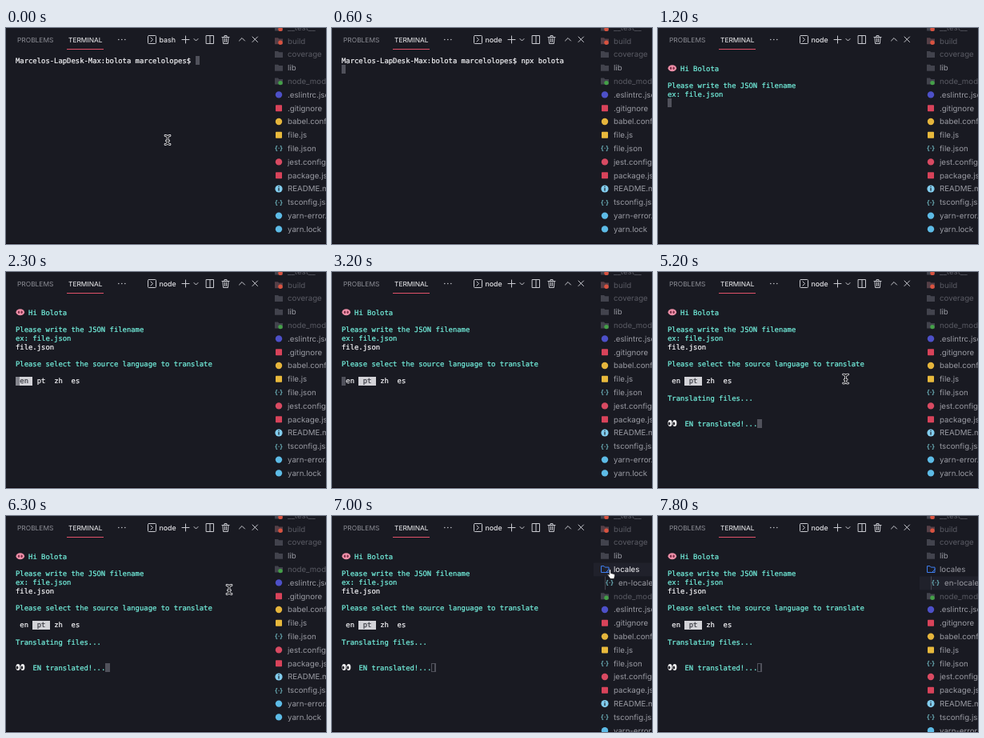
Animation, 400 px wide and 270 px high, one loop 8000 ms. Source, as an HTML page:

```html
<!DOCTYPE html>
<html lang="en">
<head>
<meta charset="utf-8">
<title>Terminal session</title>
<style>
html, body { margin: 0; width: 100%; height: 100%; overflow: hidden; background: #191a22; }
svg { display: block; width: 400px; height: 270px; }
text { font-family: Inter, "Open Sans", sans-serif; white-space: pre; text-rendering: geometricPrecision; }
.mono { font: 8.89px "DejaVu Sans Mono", monospace; stroke-width: .22; }
.line { fill: none; stroke-width: 1; stroke-linecap: round; stroke-linejoin: round; }
</style>
</head>
<body>
<svg id="stage" viewBox="0 0 400 270">
  <rect width="400" height="270" fill="#191a22"/>
  <rect y="269" width="400" height="1" fill="#120b12"/>
  <text x="14" y="18" font-size="8.4" fill="#8b8c94">PROBLEMS</text>
  <text x="78" y="18" font-size="8.4" fill="#f4f4f6">TERMINAL</text>
  <rect x="76" y="26" width="46" height="1" fill="#e0526a"/>
  <g fill="#c5c6cc"><circle cx="140.8" cy="14.500" r=".8"/><circle cx="144.8" cy="14.500" r=".8"/><circle cx="148.8" cy="14.500" r=".8"/></g>
  <g class="line" stroke="#c9cad0">
    <rect x="177.500" y="9.5" width="10" height="10" rx="1"/>
    <path d="M181 12l2.5 2.5L181 17M220 14.5h9M224.500 10v9M235 13.5l2.5 2.5 2.5-2.5"/>
    <path d="M250.5 9.5h9v10h-9zM255 9.5v10M270 11.500h9M273 11v-1.5h3V11M271 11.500l.6 8h5.8l.6-8M273.5 13v4.5M275.5 13v4.5"/>
    <path d="M291.5 16l3.5-3.500 3.5 3.5M308 11l6.500 6.500M314.500 11l-6.500 6.500"/>
  </g>
  <g id="live"></g>
</svg>
<script>
const LOOP = 8000, COL = 5.352, ROW = 10.65, TREE_ROW = 16.8;
const TEAL = "#74f2df", WHITE = "#f4f4f7", DIM = "#5a5b64", PLAIN = "#9b9ca4", BLOCK = "#50515b";
const BACK = "#191a22", FOLDER = "#42434d";
const live = document.getElementById("live");
const start = performance.now();

const colX = c => 12 + c * COL;
const rowY = r => 40.4 + r * ROW;
const rect = (x, y, w, h, fill, extra = "") =>
  `<rect x="${x}" y="${y}" width="${w}" height="${h}" fill="${fill}" ${extra}/>`;
const dot = (x, y, r, fill) => `<circle cx="${x}" cy="${y}" r="${r}" fill="${fill}"/>`;
const oval = (x, y, rx, ry, fill) => `<ellipse cx="${x}" cy="${y}" rx="${rx}" ry="${ry}" fill="${fill}"/>`;
const mono = (col, row, s, fill) =>
  `<text class="mono" x="${colX(col)}" y="${rowY(row) + 3.1}" fill="${fill}" stroke="${fill}">${s}</text>`;

// Fills whole character cells, snapped to pixels
const cells = (col, row, count, fill) => {
  const x = Math.round(colX(col)), y = Math.round(rowY(row) - 5.3);
  return rect(x, y, Math.round(colX(col + count)) - x, 11, fill);
};
const caret = (col, row, hollow) => cells(col, row, 1, BLOCK) + (hollow
  ? rect(Math.round(colX(col)) + 1, Math.round(rowY(row) - 5.3) + 1, 3, 9, BACK)
  : "");

// Icons, centred on (x, y)
const folder = (color, badge) => (x, y) =>
  `<path d="M${x - 5} ${y - 4}h4l1.300 1.300h4.700v6.700h-10z" fill="${color}"/>` +
  (badge ? dot(x + 2, y + 2, 2.7, badge) : "");
const openFolder = (x, y) =>
  `<path class="line" stroke="#3f7ff0" d="M${x - 4.5} ${y + 3.5}v-7.500h3.500l1.300 1.500h4.700v6zM${x + 2} ${y + 3.5}l3.500-4"/>`;
const ball = color => (x, y) => dot(x, y, 4.2, color);
const square = color => (x, y) => rect(x - 4, y - 4, 8, 8, color, 'rx=".8"');
const braces = (x, y) =>
  `<text x="${x}" y="${y + 2.8}" font-size="8" font-weight="600" text-anchor="middle" fill="#76c3cc">{·}</text>`;
const info = (x, y) => dot(x, y, 4.6, "#82cdee") + rect(x - .6, y - 1, 1.2, 3.6, BACK) + dot(x, y - 2.5, .7, BACK);

const folders = [
  ["__test__", folder(FOLDER, "#d9523f"), DIM],
  ["build", folder("#553f47", "#d9523f"), DIM],
  ["coverage", folder(FOLDER), DIM],
  ["lib", folder(FOLDER), PLAIN],
];
const files = [
  ["node_modules", folder(FOLDER, "#43a047"), DIM],
  [".eslintrc.json", ball("#4d50c8")],
  [".gitignore", square("#d8435a")],
  ["babel.config.js", ball("#e5b53c")],
  ["file.js", square("#e8b93c")],
  ["file.json", braces],
  ["jest.config.js", ball("#d84a62")],
  ["package.json", square("#d8435a")],
  ["README.md", info],
  ["tsconfig.json", braces],
  ["yarn-error.log", ball("#5dbbe6")],
  ["yarn.lock", ball("#5dbbe6")],
];

function tree(t) {
  const open = t >= 6900, picked = t >= 7300, rows = [...folders];
  if (t >= 6500) rows.push(["locales", open ? openFolder : folder("#3f7ff0"), open && !picked ? WHITE : PLAIN]);
  if (open) rows.push(["en-locale.json", braces, picked && t < 7800 ? "#b6b7be" : PLAIN, 6]);
  rows.push(...files);
  let s = "";
  if (open) {
    s += rect(327, picked ? 75.5 : 58.5, 73, 16.8, "#20212b");
    s += rect(341, 75.5, .8, 16.8, "#50515b");
  }
  rows.forEach(([name, icon, color = PLAIN, indent = 0], i) => {
    const y = -.6 + TREE_ROW * i;
    s += icon(341 + indent, y) +
      `<text x="${352 + indent}" y="${y + 3.4}" font-size="9.7" fill="${color}">${name}</text>`;
  });
  return s;
}

function menu(t) {
  const chosen = t < 2700 ? 0 : 1;
  let s = cells(chosen * 4, 9, 4, "#d3d3d8");
  if (t < 3300) s += cells(0, 9, 1, chosen ? BLOCK : "#85868e");
  ["en", "pt", "zh", "es"].forEach((lang, i) =>
    s += mono(1 + i * 4, 9, lang, i === chosen ? "#3a3b43" : WHITE));
  return s;
}

const snout = () => {
  const y = rowY(1) - .8;
  return oval(17.8, y, 5.3, 4, "#ee8fa8") + oval(16, y, 1.1, 1.8, "#7c2f48") + oval(19.6, y, 1.1, 1.8, "#7c2f48");
};
const eyes = () => [15, 20.8].map(x =>
  oval(x, rowY(14) - .5, 2.6, 4.1, "#f1f1f3") + oval(x - .9, rowY(14), 1.3, 2, "#2a2a30")).join("");

function terminal(t) {
  if (t < 800) {
    const command = "npx bolota".slice(0, Math.max(0, Math.floor(t / 100) * 2));
    return (t < 600 ? caret(42 + command.length, 0) : caret(0, 1)) +
      mono(0, 0, "Marcelos-LapDesk-Max:bolota marcelolopes$ " + command, WHITE);
  }
  if (t < 900) return caret(0, 0);
  let s = snout() + mono(3, 1, "Hi Bolota", TEAL);
  if (t < 1000) return s + caret(0, 2);
  s += mono(0, 3, "Please write the JSON filename", TEAL) + mono(0, 4, "ex: file.json", TEAL);
  const typed = t < 1700 ? 0 : Math.min(9, Math.ceil((Math.floor((t - 1700) / 100) + 1) * 1.5));
  s += mono(0, 5, "file.json".slice(0, typed), WHITE);
  if (t < 2300) return s + caret(typed, 5);
  s += mono(0, 7, "Please select the source language to translate", TEAL) + menu(t);
  if (t < 3300) return s;
  s += mono(0, 11, "Translating files...", TEAL);
  if (t < 4600) return s + caret(0, 12);
  return s + eyes() + mono(4, 14, "EN translated!...", TEAL) + caret(21, 14, t >= 6900);
}

// Pointer stops: time, x, y
const stops = [
  [3500, 216, 138], [3700, 231, 137], [5100, 231, 137], [5700, 279, 92], [6300, 279, 92],
  [6850, 349, 72], [7100, 349, 72], [7300, 362, 86], [7400, 362, 86], [7600, 412, 110],
];

function pointer(t) {
  let x = 202, y = 140;
  if (t >= 100) {
    const i = stops.findIndex(p => p[0] > t);
    if (i < 1) return "";
    const [t0, x0, y0] = stops[i - 1], [t1, x1, y1] = stops[i];
    let k = (t - t0) / (t1 - t0);
    k = k * k * (3 - 2 * k);
    x = x0 + (x1 - x0) * k;
    y = y0 + (y1 - y0) * k;
  }
  const at = `transform="translate(${x} ${y})"`;
  if (x > 328) return `<path ${at} d="M-2.500-4.500q1-1.500 2 0v4l4 1q1.500.5 1 2.500l-1 3.500h-4.500l-3.500-5q0-1.500 2 0z" fill="#fff" stroke="#17171c" stroke-width=".7"/>`;
  const beam = "M-3-5.500q2.500 0 3 2q.5-2 3-2M0-3.500v7M-3 5.500q2.500 0 3-2q.5 2 3 2M-1.500 1h3";
  return `<g ${at} class="line"><path d="${beam}" stroke="#e6e6ea" stroke-width="2.800"/><path d="${beam}" stroke="#08080b" stroke-width="1.100"/></g>`;
}

function draw(now) {
  const t = Math.max(0, now - start) % LOOP;
  const shell = t < 600 ? "bash" : "node";
  live.innerHTML =
    `<text x="191.500" y="17.800" font-size="8.8" font-weight="500" fill="#e2e2e6">${shell}</text>` +
    tree(t) + terminal(t) + pointer(t);
  requestAnimationFrame(draw);
}
draw(start);
</script>
</body>
</html>
```
